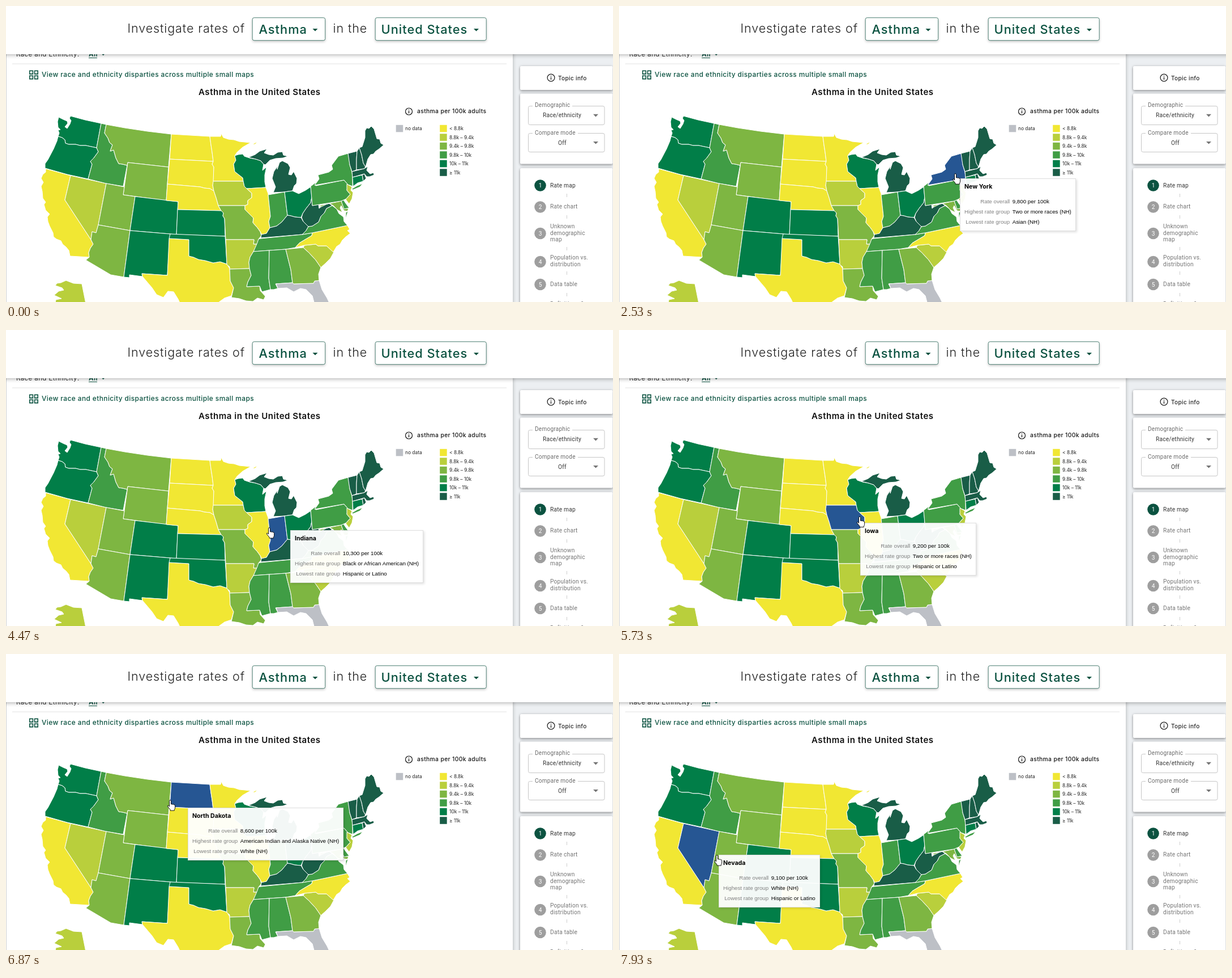
An HTML page that plays this animation: 1072 by 522 pixels, repeating every 8000 ms.

```html
<!DOCTYPE html>
<html lang="en">
<head>
<meta charset="utf-8">
<title>Rate map</title>
<style>
html, body { margin: 0; width: 100%; height: 100%; overflow: hidden; background: #fff; }
svg { position: absolute; left: 0; top: 0; display: block; }
text { font-family: Inter, sans-serif; }
.map path { stroke: #fff; stroke-width: 1; stroke-linejoin: round; }
.c0 { fill: #bdc0c6; }
.c1 { fill: #f1e733; }
.c2 { fill: #b9cf3c; }
.c3 { fill: #7eb642; }
.c4 { fill: #409d45; }
.c5 { fill: #017e48; }
.c6 { fill: #195d47; }
.map .on { fill: #265693; }
.line { fill: none; stroke: #0b5240; }
.dark { fill: #0b5240; }
.panel { fill: #fff; filter: drop-shadow(0 2px 2px rgba(0,0,0,.3)) drop-shadow(0 0 2px rgba(0,0,0,.15)); }
.card { fill: #fff; filter: drop-shadow(0 1px 3px rgba(0,0,0,.28)); }
.head { fill: #fff; filter: drop-shadow(0 2px 3px rgba(0,0,0,.28)); }
.btn { fill: #fff; stroke: #0b5240; stroke-opacity: .7; filter: drop-shadow(0 2px 2px rgba(0,0,0,.22)); }
.lead { font-weight: 300; font-size: 21.5px; letter-spacing: .9px; fill: #222; }
.pick { font-weight: 500; font-size: 21.8px; letter-spacing: 1px; fill: #0b5240; }
.link { font-weight: 500; font-size: 11.9px; letter-spacing: .42px; fill: #0b5240; }
.title { font-weight: 600; font-size: 15px; letter-spacing: .55px; fill: #111; }
.filter { font-size: 11.5px; letter-spacing: .4px; fill: #333; }
.legend text { font-size: 8.4px; fill: #222; }
.legend .key { font-weight: 500; font-size: 10.25px; letter-spacing: .4px; fill: #111; }
.topic { font-weight: 500; font-size: 10px; letter-spacing: .35px; fill: #222; }
.form text, .steps text { font-family: Roboto, sans-serif; font-size: 10.2px; letter-spacing: .2px; fill: #333; }
.form .label { font-size: 10px; letter-spacing: .27px; fill: #6b6b6b; }
.form rect { fill: none; stroke: #c6c6c6; }
.form .gap { fill: #fff; stroke: none; }
.form path { fill: #757575; }
.steps text { fill: #757575; }
.steps .now { fill: #333; }
.steps .num { fill: #fff; text-anchor: middle; letter-spacing: 0; }
.steps circle { fill: #9e9e9e; }
.steps circle.dark { fill: #0b5240; }
.steps path { stroke: #cfcfcf; }
#tip {
  position: absolute; left: 0; top: 0; box-sizing: border-box; height: 93px; padding: 6px 7px;
  white-space: nowrap; color: #000; background: rgba(255,255,255,.95);
  border: 1px solid #dedede; box-shadow: 2px 2px 4px rgba(0,0,0,.12);
  font: 9.75px/17.8px "Liberation Sans", Arial, sans-serif; visibility: hidden;
}
#tip b { display: block; font: 700 10.6px/16px Inter, sans-serif; margin-bottom: 9px; }
#tip div { display: grid; grid-template-columns: auto auto; justify-content: start; column-gap: 4.5px; }
#tip i { font-style: normal; text-align: right; color: #808080; }
#cursor path { fill: #fff; stroke: #000; stroke-width: .9; stroke-linejoin: round; }
</style>
</head>
<body>
<svg width="1072" height="522" viewBox="0 0 1072 522">
  <rect width="1072" height="522" fill="#eceff2"/>
  <rect class="card" x="1" y="60" width="894" height="480"/>
  <text class="filter" x="18" y="89">Race and Ethnicity:</text>
  <text class="link" x="146" y="89" style="font-weight:600">All</text>
  <path class="line" d="M146,91.5H161"/>
  <path class="dark" d="M169,84.5h5.4l-2.7,2.8z"/>
  <path d="M11,102H884" stroke="#e2e2e2"/>
  <path class="line" stroke-width="1.6" d="M41.8,114.3h5.6v5.6h-5.6zM50.6,114.3h5.6v5.6h-5.6zM41.8,123h5.6v5.6h-5.6zM50.6,123h5.6v5.6h-5.6z"/>
  <text class="link" x="63" y="125.3">View race and ethnicity disparties across multiple small maps</text>
  <text class="title" x="340" y="157">Asthma in the United States</text>

  <g class="map">
    <path class="c5" d="M114,194 140,201 168,207 160,250 141,246 131,246 123,244 111,244 105,242 104,236 99,232 92,230 94,224 92,219 96,218 92,214 91,204 93,196 101,200 108,203 109,207 104,213 108,216 113,208 115,202 112,198z"/>
    <path class="c5" d="M92,230 99,232 104,236 105,242 111,244 123,244 131,246 141,246 160,250 163,257 155,268 149,274 152,279 145,305 108,297 69,286 69,278 74,271 84,252 90,238z"/>
    <path class="c1" d="M70,287 114,299 104,342 150,412 154,420 149,427 146,435 147,443 113,441 111,431 106,425 100,420 97,414 89,411 84,407 83,400 77,388 74,380 73,372 77,367 70,360 67,350 70,346 65,339 64,327 62,318 66,311 62,304 65,297 70,293z"/>
    <path class="c2" id="nv" d="M114,299 177,313 163,386 159,400 152,398 150,412 104,342z"/>
    <path class="c4" id="id" d="M168,207 177,209 174,224 180,233 183,241 188,245 184,256 190,254 194,268 199,278 206,279 214,281 207,318 177,313 145,305 152,279 149,274 155,268 163,257 160,250z"/>
    <path class="c3" id="mt" d="M177,209 210,215 250,221 292,226 287,284 215,276 214,281 206,279 199,278 194,268 190,254 184,256 188,245 183,241 180,233 174,224z"/>
    <path class="c3" d="M215,276 287,284 283,343 207,333z"/>
    <path class="c3" d="M177,313 209,319 207,333 228,336 219,396 163,386z"/>
    <path class="c3" d="M163,386 219,396 208,478 185,474 141,448 147,443 146,435 149,427 154,420 150,412 152,398 159,400z"/>
    <path class="c5" d="M228,336 304,345 301,403 219,396z"/>
    <path class="c5" d="M219,396 290,402 285,475 240,472 241,477 218,474 218,479 208,478z"/>
    <path class="c1" id="nd" d="M292,226 360,230 362,245 364,258 366,274 289,270z"/>
    <path class="c1" d="M289,270 366,274 364,279 367,284 367,309 365,316 367,326 360,322 350,321 343,319 285,314z"/>
    <path class="c1" d="M285,314 343,319 350,321 360,322 367,326 371,338 375,352 380,361 303,359 304,345 283,343z"/>
    <path class="c5" d="M303,359 380,361 384,365 383,370 386,375 387,406 301,403z"/>
    <path class="c1" d="M288,410 323,412 323,441 331,443 340,447 352,449 366,453 378,451 390,455 395,463 396,485 402,497 398,511 386,515 372,525 310,530 304,517 296,504 286,503 278,514 266,509 258,497 241,477 240,472 285,475z"/>
    <path class="c5" d="M290,402 387,406 388,420 390,455 378,451 366,453 352,449 340,447 331,443 323,441 323,412 288,410z"/>
    <path class="c1" id="mn" d="M360,230 379,230 380,225 384,232 393,235 403,236 412,239 432,241 418,249 408,258 404,264 406,272 402,279 404,292 418,303 419,309 366,309 367,284 364,279 366,274 364,258 362,245z"/>
    <path class="c2" id="ia" d="M366,309 419,309 421,318 425,322 434,330 434,338 427,343 427,350 422,352 375,352 371,338 367,326 365,316z"/>
    <path class="c3" d="M375,352 422,352 422,359 432,369 437,374 436,382 444,391 449,398 451,405 446,411 444,420 437,420 438,412 388,412 386,375 383,370 384,365 380,361z"/>
    <path class="c2" d="M388,412 438,412 437,420 444,420 437,433 431,443 429,452 430,463 395,464 395,460 390,456z"/>
    <path class="c3" d="M395,464 430,463 433,475 427,487 425,495 448,494 449,502 458,512 455,518 444,515 436,521 424,520 412,516 398,514 402,497 396,485z"/>
    <path class="c5" d="M404,264 410,262 418,261 421,265 430,268 441,270 450,273 455,279 453,290 460,284 457,298 457,310 459,320 425,322 421,318 419,309 418,303 404,292 402,279 406,272z"/>
    <path class="c6" d="M428,267 440,262 448,256 461,252 456,259 464,262 472,263 480,258 488,257 490,263 498,265 489,268 476,269 466,272 458,280 455,279 450,273 441,270z"/>
    <path class="c6" d="M472,329 476,319 470,304 473,292 479,283 479,288 483,276 488,273 498,278 502,285 499,297 504,298 508,292 514,304 513,313 509,317 506,326 491,328z"/>
    <path class="c1" stroke="none" d="M435,244 444,239 440,244z"/>
    <path class="c1" id="il" d="M425,322 459,320 463,331 467,371 464,380 466,391 460,401 452,404 449,398 444,391 436,382 437,374 432,369 422,359 422,352 427,350 427,343 434,338 434,330z"/>
    <path class="c4" id="in" d="M463,333 492,328 497,369 487,381 478,388 466,391 464,380 467,371z"/>
    <path class="c5" id="oh" d="M492,328 506,326 517,331 529,325 538,319 540,337 538,347 530,357 524,366 521,373 510,372 503,370 497,369z"/>
    <path class="c6" d="M450,409 451,403 460,401 466,391 478,388 487,381 497,369 503,370 510,372 521,373 525,380 534,389 530,396 523,403z"/>
    <path class="c4" d="M450,410 523,403 541,400 540,405 528,412 518,418 511,426 494,429 465,431 437,433 441,424 444,417 446,411z"/>
    <path class="c4" d="M437,433 465,431 464,480 467,500 452,504 448,494 425,495 427,487 433,475 430,463 429,452 431,443z"/>
    <path class="c4" d="M465,431 494,429 503,465 506,488 476,490 480,498 473,500 467,500 464,480z"/>
    <path class="c0" d="M477,490 506,488 508,490 543,489 545,485 553,484 558,500 567,515 574,530 546,530 541,511 530,500 520,498 508,504 496,497 480,498z"/>
    <path class="c3" d="M494,429 525,426 535,435 547,448 556,461 552,473 553,484 545,485 543,489 508,490 506,488 503,465z"/>
    <path class="c2" d="M525,426 527,422 547,420 551,423 566,423 579,434 573,445 564,454 556,461 547,448 535,435z"/>
    <path class="c1" d="M541,400 603,387 607,394 603,396 608,401 600,407 594,413 590,420 584,424 578,434 566,423 551,423 547,420 527,422 511,426 518,418 528,412 540,405z"/>
    <path class="c4" d="M534,389 541,388 552,381 556,371 562,365 566,357 576,352 584,358 588,366 596,372 597,380 603,387 541,400 523,403 530,396zM600,364 604,362 600,375z"/>
    <path class="c6" d="M540,337 541,352 552,350 553,357 561,350 569,347 576,352 566,357 562,365 556,371 552,381 541,388 534,389 525,380 522,373 524,366 530,357 538,347z"/>
    <path class="c3" d="M553,352 592,344 597,357 605,357 603,362 597,361 592,352 590,356 594,364 586,360 578,352 571,348 565,350 557,354z"/>
    <path class="c4" d="M592,344 596,342 600,348 606,356 597,358z"/>
    <path class="c4" id="pa" d="M538,318 546,312 547,317 597,307 604,315 602,325 608,332 601,340 592,344 541,352z"/>
    <path class="c2" d="M602,314 611,319 609,325 613,329 611,340 606,349 600,341 608,332 602,325z"/>
    <path class="c4" id="ny" d="M545,316 553,305 551,298 570,293 577,288 575,281 587,265 604,260 606,270 607,280 611,293 612,302 612,318 604,315 597,307zM610,323 620,317 630,313 625,319 613,324z"/>
    <path class="c6" d="M604,260 620,256 619,270 619,289 611,292 607,280z"/>
    <path class="c6" d="M620,256 624,250 628,262 631,277 635,284 632,287 619,289 619,270z"/>
    <path class="c6" d="M624,250 629,248 634,232 634,220 637,215 641,216 645,212 650,217 655,234 660,235 662,242 667,245 659,252 653,256 649,261 644,262 639,270 635,284 631,277 628,262z"/>
    <path class="c6" d="M611,292 632,287 639,283 637,290 643,296 649,294 650,298 642,301 637,301 633,296 612,302z"/>
    <path class="c5" id="ct" d="M612,302 629,298 631,309 621,312 613,318z"/>
    <path class="c6" id="ri" d="M629,298 633,296 636,304 631,309z"/>
    <path class="c2" d="M86,530 88,518 98,516 85,510 93,503 102,501 99,497 87,493 90,489 97,488 106,484 119,489 134,490 142,530z"/>
  </g>

  <g class="legend">
    <circle cx="711.5" cy="186" r="6" fill="none" stroke="#111" stroke-width="1.2"/>
    <path d="M711.5,185v4.2M711.5,182.4v1.4" stroke="#111" stroke-width="1.3"/>
    <text class="key" x="726" y="189">asthma per 100k adults</text>
    <rect class="c0" x="688.7" y="209.8" width="12.5" height="12.5"/><text x="705" y="219">no data</text>
    <rect class="c1" x="766.2" y="209.8" width="12.5" height="12.5"/><text x="783" y="219">&lt; 8.8k</text>
    <rect class="c2" x="766.2" y="225.3" width="12.5" height="12.5"/><text x="783" y="234.5">8.8k – 9.4k</text>
    <rect class="c3" x="766.2" y="240.8" width="12.5" height="12.5"/><text x="783" y="250">9.4k – 9.8k</text>
    <rect class="c4" x="766.2" y="256.3" width="12.5" height="12.5"/><text x="783" y="265.5">9.8k – 10k</text>
    <rect class="c5" x="766.2" y="271.8" width="12.5" height="12.5"/><text x="783" y="281">10k – 11k</text>
    <rect class="c6" x="766.2" y="287.3" width="12.5" height="12.5"/><text x="783" y="296.5">≥ 11k</text>
  </g>

  <rect class="panel" x="908" y="106" width="163.5" height="42" rx="2"/>
  <rect class="panel" x="908" y="154.5" width="163.5" height="124" rx="2"/>
  <rect class="panel" x="908" y="286" width="163.5" height="250" rx="2"/>
  <circle cx="962.5" cy="126.5" r="6.4" fill="none" stroke="#222" stroke-width="1.3"/>
  <path d="M962.5,125.5v4.4M962.5,122.7v1.5" stroke="#222" stroke-width="1.3"/>
  <text class="topic" x="975" y="130.5">Topic info</text>

  <g class="form">
    <rect x="922.5" y="176.5" width="134.5" height="33" rx="3"/>
    <rect class="gap" x="930" y="174" width="70" height="5"/>
    <text class="label" x="934" y="178">Demographic</text>
    <text x="948" y="196">Race/ethnicity</text>
    <path d="M1037,190.8h9l-4.5,4.6z"/>
    <rect x="922.5" y="224.5" width="134.5" height="33" rx="3"/>
    <rect class="gap" x="930" y="222" width="80" height="5"/>
    <text class="label" x="934" y="226.5">Compare mode</text>
    <text x="975" y="244.5">Off</text>
    <path d="M1037,239h9l-4.5,4.6z"/>
  </g>

  <g class="steps">
    <path d="M990.5,331v6M990.5,369v6M990.5,425v6M990.5,468v6M990.5,506v6"/>
    <circle class="dark" cx="943.5" cy="316.5" r="10.3"/><text class="num" x="943.5" y="320">1</text>
    <text class="now" x="961" y="319.5">Rate map</text>
    <circle cx="943.5" cy="354.5" r="10.3"/><text class="num" x="943.5" y="358">2</text>
    <text x="961" y="357.3">Rate chart</text>
    <circle cx="943.5" cy="401" r="10.3"/><text class="num" x="943.5" y="404.6">3</text>
    <text x="961" y="392.3">Unknown</text>
    <text x="961" y="403.8">demographic</text>
    <text x="961" y="415.3">map</text>
    <circle cx="943.5" cy="451" r="10.3"/><text class="num" x="943.5" y="454.6">4</text>
    <text x="961" y="447.3">Population vs.</text>
    <text x="961" y="458.8">distribution</text>
    <circle cx="943.5" cy="491" r="10.3"/><text class="num" x="943.5" y="494.6">5</text>
    <text x="961" y="494.3">Data table</text>
    <text x="961" y="528.5">Definitions &amp;</text>
  </g>

  <rect class="head" x="-10" y="-10" width="1092" height="95"/>
  <text class="lead" x="214.5" y="47.3">Investigate rates of</text>
  <text class="lead" x="577.5" y="47.3">in the</text>
  <rect class="btn" x="435.2" y="20.7" width="128.5" height="40" rx="3"/>
  <rect class="btn" x="652.2" y="20.7" width="196" height="40" rx="3"/>
  <text class="pick" x="446.5" y="49">Asthma</text>
  <text class="pick" x="662.5" y="49">United States</text>
  <path class="dark" d="M541.5,40h9l-4.5,4.6zM826,40h9l-4.5,4.6z"/>
</svg>

<div id="tip"></div>

<svg width="1072" height="522" viewBox="0 0 1072 522">
  <g id="cursor">
    <path id="arrow" d="M0,0V14.5L3.4,11.4 5.6,16.5 8,15.5 5.8,10.5H10.2z"/>
    <path id="hand" d="M-1.5,1.2a1.5,1.5 0 0 1 3,0V7q1.4-.9 2.6,.3q1.5-.8 2.5,.5q2-.3 2,1.7v3.5q0,2-1.3,3.5v1.6h-7.2v-1.5q-2-2.6-4.6-5.8q-.6-2 1.2-1.6l1.8,1.8z"/>
  </g>
</svg>

<script>
const el = id => document.getElementById(id);
const LOOP = 8000, TICK = LOOP / 120;

// pointer path: tick, x, y
const path = [
  [0, 1085, 540], [1, 1040, 508], [4, 850, 395], [7, 785, 361], [10, 785, 361], [12, 759, 352],
  [17, 759, 352], [22, 700, 325], [29, 638, 300], [30, 625, 297], [31, 612, 297], [34, 600, 297],
  [38, 594, 296], [58, 594, 296], [59, 588, 304], [60, 574, 318], [61, 560, 328], [63, 560, 328],
  [67, 465, 349], [71, 442, 354], [84, 442, 354], [88, 408, 305], [92, 386, 270], [95, 386, 270],
  [96, 367, 270], [97, 351, 268], [99, 333, 264], [101, 333, 264], [103, 290, 258], [105, 239, 250],
  [107, 239, 250], [110, 167, 261], [113, 160, 283], [116, 160, 325], [119, 173, 355]
];

// tooltip: tick, state, left, top
const tips = [
  [30, "ri", 643, 308], [31, "ct", 635, 308], [32, "ny", 618, 306], [35, "ny", 608, 305], [38, "ny", 602, 304],
  [59, "ny", 604, 312], [60, "pa", 579, 328], [61, "pa", 568, 336], [64, "pa", 552, 341], [65, "oh", 526, 348],
  [66, "in", 502, 353], [68, "il", 468, 360], [71, "il", 452, 364], [86, "ia", 426, 340], [87, "ia", 424, 328],
  [89, "mn", 412, 308], [90, "mn", 406, 296], [92, "mn", 395, 280], [96, "mn", 375, 281], [98, "nd", 360, 283],
  [99, "nd", 342, 274], [102, "nd", 321, 271], [104, "mt", 275, 264], [105, "mt", 248, 260], [108, "mt", 225, 264],
  [109, "id", 200, 267], [110, "id", 178, 264], [112, "id", 172, 284], [114, "id", 170, 306],
  [115, "nv", 170, 321], [117, "nv", 173, 345], [119, "nv", 176, 354]
];

const two = "Two or more races (NH)", black = "Black or African American (NH)", asian = "Asian (NH)",
  latino = "Hispanic or Latino", white = "White (NH)", native = "American Indian and Alaska Native (NH)";
const facts = {
  ri: ["Rhode Island", "11,700", two, asian],
  ct: ["Connecticut", "10,500", black, asian],
  ny: ["New York", "9,800", two, asian],
  pa: ["Pennsylvania", "10,000", black, asian],
  oh: ["Ohio", "10,800", two, asian],
  in: ["Indiana", "10,300", black, latino],
  il: ["Illinois", "8,700", latino, asian],
  ia: ["Iowa", "9,200", two, latino],
  mn: ["Minnesota", "8,800", two, "Multiple groups"],
  nd: ["North Dakota", "8,600", native, white],
  mt: ["Montana", "9,600", two, white],
  id: ["Idaho", "9,800", latino, white],
  nv: ["Nevada", "9,100", white, latino]
};

function pointer(n) {
  const i = path.findIndex(p => p[0] > n);
  if (i < 0) return path[path.length - 1].slice(1);
  const [a, x, y] = path[i - 1], [b, u, v] = path[i], k = (n - a) / (b - a);
  return [x + (u - x) * k, y + (v - y) * k];
}

let active = null;
function activate(id) {
  if (id === active) return;
  if (active) el(active).classList.remove("on");
  active = id;
  el("tip").style.visibility = id ? "visible" : "hidden";
  if (!id) return;
  el(id).classList.add("on");
  const [name, rate, high, low] = facts[id];
  el("tip").innerHTML = `<b>${name}</b><div><i>Rate overall</i><span>${rate} per 100k</span>` +
    `<i>Highest rate group</i><span>${high}</span><i>Lowest rate group</i><span>${low}</span></div>`;
}

function draw(ms) {
  const n = Math.floor((ms % LOOP + 5) / TICK) % 120;
  const [x, y] = pointer(n);
  const tip = tips.filter(t => t[0] <= n).pop();
  activate(tip ? tip[1] : null);
  if (tip) el("tip").style.transform = `translate(${tip[2]}px,${tip[3]}px)`;
  el("cursor").setAttribute("transform", `translate(${x},${y})`);
  el("hand").style.display = tip ? "" : "none";
  el("arrow").style.display = tip ? "none" : "";
}

const start = performance.now();
function frame() {
  draw(performance.now() - start);
  requestAnimationFrame(frame);
}
frame();
</script>
</body>
</html>
```
